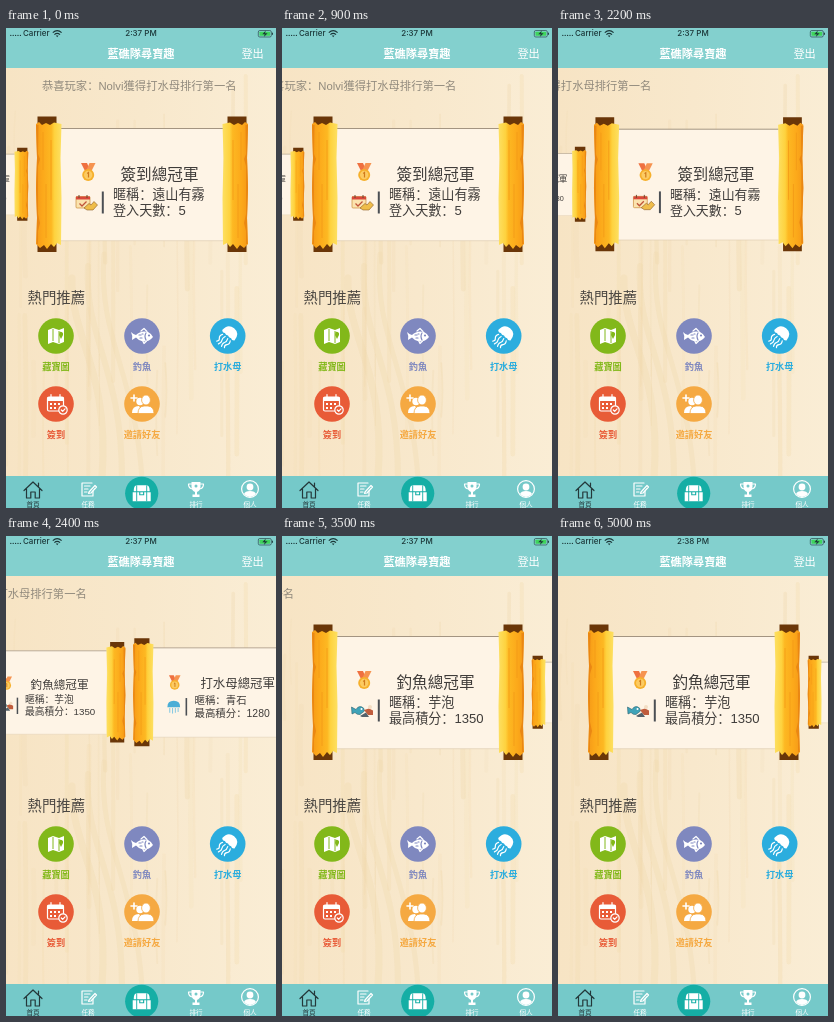
These frames come from a looping animation (270 by 480 pixels, 5.1 s). An HTML page:

```html
<!DOCTYPE html>
<html lang="zh-Hans">
<head>
<meta charset="utf-8">
<title>任務首頁</title>
<style>
html, body { margin: 0; width: 100%; height: 100%; overflow: hidden; background: #f8e8cc; }
svg { display: block; width: 270px; height: 480px; }
text { font-family: "Liberation Sans", "Noto Sans CJK SC", "Noto Sans CJK TC", sans-serif; white-space: pre; }
.status { font-family: Inter, sans-serif; font-size: 8px; font-weight: 500; fill: #1b3638; }
.mid { text-anchor: middle; }
.line { fill: none; stroke: #fff; stroke-width: 1.2; stroke-linecap: round; stroke-linejoin: round; }
.label { font-size: 9.2px; font-weight: 700; text-anchor: middle; }
.tab { font-size: 6.6px; font-weight: 500; text-anchor: middle; }
</style>
</head>
<body>
<svg viewBox="0 0 270 480">
  <defs>
    <linearGradient id="wood" x2="1">
      <stop offset="0" stop-color="#f7e4c4"/>
      <stop offset=".5" stop-color="#f8e8cc"/>
      <stop offset="1" stop-color="#faedd5"/>
    </linearGradient>
    <linearGradient id="gold">
      <stop offset="0" stop-color="#f59a18"/>
      <stop offset=".25" stop-color="#fca81a"/>
      <stop offset=".6" stop-color="#fdb822"/>
      <stop offset=".72" stop-color="#fed23e"/>
      <stop offset="1" stop-color="#fde062"/>
    </linearGradient>
    <g id="roll">
      <path d="M31.5 88.5H50.5V98H31.5ZM31.5 214H50.5V224H31.5Z" fill="#6a3608"/>
      <path d="M30 96L33 94 36 97 40 95 44 97 48 94.5 55.500 96 54.500 130 55.500 170 55 217 51 215 48 219 45 216 41 221 38 217 34 220 30 216 31 190 30 160 31 130Z" fill="url(#gold)"/>
      <path d="M30 97H32.500L32 126 34 131 32 138V186L34 195 32 203V216H30.500L31 190 30 160 31 130Z" fill="#ea8713"/>
      <path d="M37 104V142M40 156V210M45 112V172" stroke="#f39a18" stroke-width=".8"/>
    </g>
    <g id="medal">
      <path d="M75 135H81L84.500 143H79Z" fill="#ef7040"/>
      <path d="M89.500 135H83.500L80 143H85.500Z" fill="#f69350"/>
      <circle cx="82.200" cy="147" r="6" fill="#f6b02c"/>
      <circle cx="82.200" cy="147" r="4.200" fill="#fccb62"/>
      <path d="M81.200 145.500L82.500 144.500V149.500" fill="none" stroke="#d07a1c" stroke-width="1.200"/>
    </g>
    <g id="scroll">
      <path d="M54 100.500H217V212.700H54Z" fill="#fef4e6"/>
      <path d="M54 100.500H217" stroke="#9a8b78" stroke-width=".9"/>
      <path d="M54 212.700H217" stroke="#dac8ae" stroke-width=".6"/>
      <use href="#roll"/>
      <use href="#roll" transform="translate(272) scale(-1 1)"/>
      <use href="#medal"/>
      <path d="M96.800 163.500V185.500" stroke="#4b4f54" stroke-width="2"/>
    </g>
  </defs>

  <rect width="270" height="480" fill="url(#wood)"/>
  <g id="grain" fill="none" stroke="#efd6a8" stroke-linecap="round"></g>

  <text id="news" y="61.500" font-size="11.300" fill="#918a7d">恭喜玩家：Nolvi獲得打水母排行第一名</text>
  <g id="cards" fill="#3f3c3a"></g>

  <path d="M0 0H270V40H0Z" fill="#83d0ce"/>
  <g fill="#1b3638" id="dots"></g>
  <text class="status" x="17" y="8.400">Carrier</text>
  <g fill="none" stroke="#1b3638" stroke-width="1.200">
    <path d="M46.800 4.600Q51.200 .8 55.600 4.600M48.400 6.600Q51.200 4.200 54 6.600"/>
    <path d="M49.900 7.500H52.500L51.200 9.200Z" fill="#1b3638" stroke="none"/>
  </g>
  <text class="status mid" id="clock" x="135" y="8.400"></text>
  <g transform="translate(.8 0)">
    <rect x="251.500" y="2.500" width="13" height="6.500" rx="1.500" fill="none" stroke="#1b3638" stroke-width=".6"/>
    <rect x="252.700" y="3.700" width="10.600" height="4.100" rx=".6" fill="#3fd45c"/>
    <path d="M259 2.600L255.500 6.300H258L257 9 260.800 5.300H258.200Z" fill="#1b3638"/>
    <path d="M265.600 4.700V6.800" stroke="#1b3638"/>
  </g>
  <text class="mid" x="135" y="29.600" font-size="11.200" font-weight="700" fill="#fff">藍礁隊尋寶趣</text>
  <text class="mid" x="246.600" y="30.200" font-size="11.200" fill="#fff">登出</text>

  <text x="21.500" y="275" font-size="14.400" fill="#4b4742">熱門推薦</text>
  <g id="menu"></g>

  <path d="M0 448H270V480H0Z" fill="#75c9c9"/>
  <g id="tabs"></g>
</svg>
<script>
const LOOP = 5100;
const $ = id => document.getElementById(id);

// Wood: soft vertical bands, then a few broad curves around a knot
let seed = 7;
const rand = () => (seed = seed * 16807 % 2147483647) / 2147483647;
let grain = '';
for (let i = 0; i < 40; i++) {
  const x = rand() * 250, y = 40 + rand() * 320, len = 50 + rand() * 180, bend = rand() * 6 - 3;
  grain += `<path d="M${x} ${y}q${bend} ${len / 2} 0 ${len}" stroke-width="${1 + rand() * 4}" opacity="${.12 + rand() * .18}"/>`;
}
for (let i = 0; i < 3; i++)
  grain += `<path d="M${66 + i * 16} ${250 - i * 12}C${64 + i * 14} 310 ${104 + i * 12} 340 ${96 + i * 20} 450" stroke-width="${7 - i}" opacity=".3"/>`;
$('grain').innerHTML = grain;

for (let i = 0; i < 5; i++)
  $('dots').innerHTML += `<circle cx="${4.8 + i * 2.4}" cy="7.400" r=".65"/>`;

// Carousel
const calendar = `
  <rect x="70" y="168.500" width="14" height="11.500" rx="1" fill="#fbe3ae" stroke="#c98b3a" stroke-width=".7"/>
  <path d="M70 168.500H84V171.500H70Z" fill="#d9483b"/>
  <path d="M73 167V170M81 167V170" stroke="#6d4a2c"/>
  <path d="M73.500 175.500L76 178 80.500 173.500" fill="none" stroke="#c0533a" stroke-width="1.300"/>
  <path d="M78 180L83 175.500 85 177 88 173.500 91.500 177 87 182H81Z" fill="#efbd4a" stroke="#8b5b24" stroke-width=".6"/>`;
const fishing = `
  <path d="M69.500 171L74 173.500Q77 168.500 81.500 172L82.500 175 78 178.500Q75 179 73 176.500L70 178Z" fill="#3fa3b8" stroke="#2b6170" stroke-width=".6"/>
  <circle cx="79.500" cy="173" r="1" fill="#fff"/>
  <path d="M82 174L87 172.500 91 174.500V179H86Z" fill="#c05c3c"/>
  <path d="M78 180L84 176.500 87 181H80Z" fill="#54626b"/>
  <circle cx="88" cy="171" r="2" fill="#f3ddc4"/>`;
const jelly = `
  <path d="M73 175Q73 167 81 167T89 175Z" fill="#4aaed6"/>
  <path d="M76 176V182M79.500 176V183M83 176V182M86.500 176V181" stroke="#7cc6e2" stroke-width="1.200"/>`;
const champions = [
  ['釣魚總冠軍', fishing, '芋泡', '最高積分：1350'],
  ['打水母總冠軍', jelly, '青石', '最高積分：1280'],
  ['簽到總冠軍', calendar, '遠山有霧', '登入天數：5']
];
$('cards').innerHTML = champions.map(([title, icon, name, score]) => `
  <g><g transform="translate(-136 -156.300)">
    <use href="#scroll"/>${icon}
    <text x="114.500" y="151.500" font-size="15.600">${title}</text>
    <text x="107" y="171" font-size="13.100">暱稱：${name}</text>
    <text x="107" y="187" font-size="13.100">${score}</text>
  </g></g>`).join('');

// Menu
const buttons = [
  [50, 308, '#82b81a', '藏寶圖', `
    <path d="M-8-6L-3-8 3-6 8-8V6L3 8-3 6-8 8Z" fill="#fff"/>
    <path d="M-3-7V5M3-5V7" stroke="#82b81a"/>
    <path d="M3.500-4A2.500 2.500 0 0 1 7-1L5 3 3-1Z" fill="#82b81a"/>`],
  [136, 308, '#7f88bf', '釣魚', `
    <path d="M-11-4Q-8-1-6-1Q-1-6 6-4Q10-2 11 1Q7 6 1 5.500Q-3 5-6 1.500L-10 4Q-9 0-11-4Z" fill="#fff"/>
    <path class="line" d="M-1-5L2-7.500 5-4.500M1 5.500L2 7.500 4.500 5"/>
    <circle cx="7" cy="-.5" r="1.100" fill="#7f88bf"/>
    <path class="line" d="M4-3Q2 0 4 4M-3-1H-1M-2 2H0M0-2H1" style="stroke:#7f88bf"/>`],
  [221.700, 308, '#2badde', '打水母', `
    <g transform="rotate(40)"><path d="M-8-1Q-8-10 0-10T8-1Q6 1 4-.5 2 1 0-.5-2 1-4-.5-6 1-8-1Z" fill="#fff"/>
    <path class="line" d="M-5 2Q-7 5-5 7T-5 11M-1.700 2Q-3 5-1.700 7T-2 12M1.700 2Q3 5 1.700 7T2 12M5 2Q7 5 5 7T5 11"/></g>`],
  [50, 376, '#e85b37', '簽到', `
    <rect class="line" x="-8.500" y="-7" width="16" height="14" rx="1.500"/>
    <path d="M-8.500-7H7.500V-3H-8.500Z" fill="#fff"/>
    <path class="line" d="M-5-9.500V-6M4-9.500V-6"/>
    <path d="M-6-1H-4V1H-6ZM-2-1H0V1H-2ZM2-1H4V1H2ZM-6 3H-4V5H-6ZM-2 3H0V5H-2Z" fill="#fff"/>
    <circle class="line" cx="7" cy="6" r="4.200" style="fill:#e85b37"/>
    <path class="line" d="M5.300 6L6.700 7.400 9 4.800"/>`],
  [136, 376, '#f5a942', '邀請好友', `
    <circle cx="-2" cy="-2.500" r="3.700" fill="#fff"/>
    <path d="M-10 9Q-10 2-3 2L1 9Z" fill="#fff"/>
    <g fill="#fff" stroke="#f5a942" stroke-width=".8">
      <ellipse cx="4" cy="-4" rx="4.400" ry="5"/>
      <path d="M-4 9.500Q-4 2.500 2 2H6Q12 2.500 12 9.500Z"/>
    </g>
    <path class="line" d="M-8-9V-3M-11-6H-5" style="stroke-width:1.600"/>`]
];
$('menu').innerHTML = buttons.map(([x, y, color, label, icon]) => `
  <g transform="translate(${x} ${y})">
    <circle r="17.800" fill="${color}"/>${icon}
    <text class="label" y="34.300" fill="${color}">${label}</text>
  </g>`).join('');

// Tab bar
const tabs = [
  [27, '首頁', '#24383a', `<path class="line" d="M-9 .5L0-8 9 .5M-6.500-1V8H-2.200V2H2.200V8H6.500V-1M5.500-7V-3.500" style="stroke:#24383a"/>`],
  [82, '任務', '#fff', `
    <path class="line" d="M4-7H-6V6H5V1M-3.500-4H2M-3.500-1H0M-3.500 2H-1"/>
    <path class="line" d="M1 2L7-4.500 8.500-3 3 3 .5 3.500Z"/>`],
  [135.700, '', '', `
    <circle cy="3.300" r="16.600" fill="#15aea5"/>
    <g transform="translate(0 3.300)"><path d="M-8-2Q-8-8-5-8H5Q8-8 8-2ZM-9-1H-2.500V2H2.500V-1H9V8H-9Z" fill="#fff"/>
    <path d="M-5-8V8M5-8V8" stroke="#15aea5" stroke-width=".9"/>
    <path d="M-1.400-1H1.400V1H-1.400Z" fill="#fff"/></g>`],
  [190, '排行', '#fff', `
    <path d="M-4.500-8H4.500V-3Q4 1 1 2V4.500H3.500V7H-3.500V4.500H-1V2Q-4 1-4.500-3Z" fill="#fff"/>
    <path class="line" d="M-4.500-6H-7.500Q-7.500-1.500-3.500-1M4.500-6H7.500Q7.500-1.500 3.500-1"/>
    <circle cy="-4" r="1.500" fill="#75c9c9"/>`],
  [244, '個人', '#fff', `
    <circle class="line" cy="-1" r="8.400"/>
    <circle cy="-3" r="3.400" fill="#fff"/>
    <path d="M-6 4Q-5 1 0 1T6 4Q3 7 0 7T-6 4Z" fill="#fff"/>`]
];
$('tabs').innerHTML = tabs.map(([x, label, color, icon]) => `
  <g transform="translate(${x} 462)">${icon}
    <text class="tab" y="17.300" fill="${color}">${label}</text>
  </g>`).join('');

// Timeline
const NEWS_SPEED = .0624;               // px per ms
const SWIPE = { start: 2175, length: 350 };
const PAGE = 171, SMALL = .54;
const cards = [...$('cards').children];
const clamp = v => Math.min(1, Math.max(0, v));
const ease = v => (1 - Math.cos(Math.PI * v)) / 2;

function draw(t) {
  $('news').setAttribute('x', 36 - NEWS_SPEED * t);
  $('clock').textContent = t < 4500 ? '2:37 PM' : '2:38 PM';

  // The carousel runs back from the last page to the first
  const page = (cards.length - 1) * (1 - ease(clamp((t - SWIPE.start) / SWIPE.length)));
  cards.forEach((card, i) => {
    const away = i - page;
    const scale = 1 - (1 - SMALL) * clamp(Math.abs(away));
    card.setAttribute('transform', `translate(${136 + PAGE * away} 156.300) scale(${scale})`);
  });
}

function tick() {
  draw(performance.now() % LOOP);
  requestAnimationFrame(tick);
}
tick();
</script>
</body>
</html>
```
